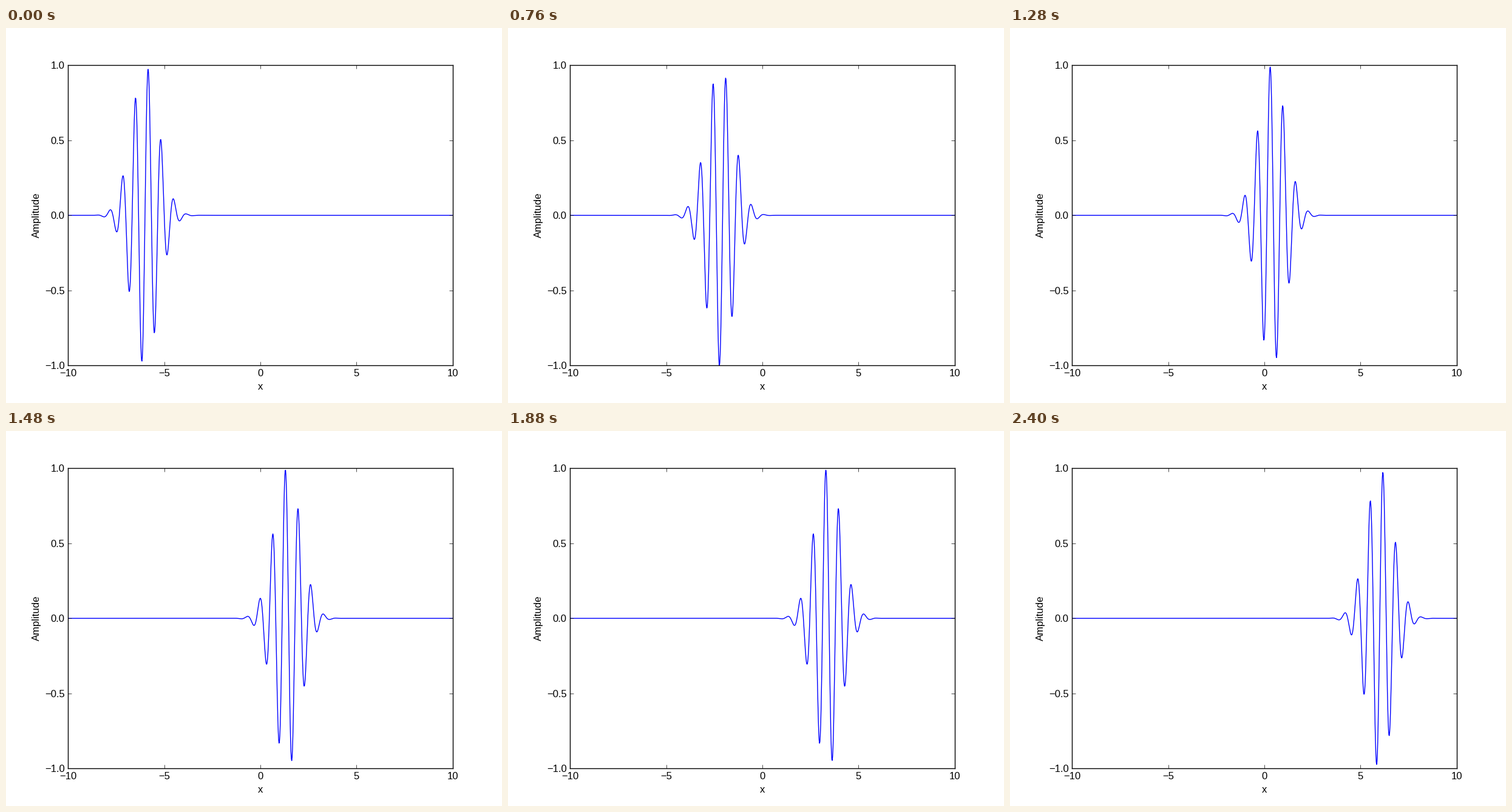
Recreate the animation shown at these times as a matplotlib script. Size 817 by 617 pixels, loop 2.44 s.

```python
import numpy as np
import matplotlib.pyplot as plt
from matplotlib.animation import FuncAnimation

FRAMES, INTERVAL = 61, 40
START, STEP = -6.0, 0.2
WAVENUMBER = 3 * np.pi
PHASE_STEP = 0.2 * np.pi
WIDTH, HEIGHT, DPI = 817, 617, 100

plt.rcParams.update({
    "font.family": "Liberation Sans",
    "font.size": 12,
    "axes.linewidth": 1.0,
    "axes.labelsize": 12,
    "axes.labelpad": 5,
    "axes.axisbelow": False,
    "text.hinting_factor": 8,
})
for side, mirror in (("xtick", "top"), ("ytick", "right")):
    plt.rcParams.update({
        f"{side}.direction": "in",
        f"{side}.{mirror}": True,
        f"{side}.labelsize": 12,
        f"{side}.major.size": 4,
        f"{side}.major.width": 0.5,
        f"{side}.major.pad": 4,
    })

fig = plt.figure(figsize=(WIDTH / DPI, HEIGHT / DPI), dpi=DPI,
                 facecolor="white")
# The plot box in pixels: left, bottom, width, height.
left, bottom, box_w, box_h = 102.19, 61.75, 633.56, 494
ax = fig.add_axes([left / WIDTH, bottom / HEIGHT,
                   box_w / WIDTH, box_h / HEIGHT])
ax.set(xlim=(-10, 10), ylim=(-1, 1), xlabel="x")
ax.set_ylabel("Amplitude", labelpad=4.2)
ax.set_xticks([-10, -5, 0, 5, 10])
ax.set_yticks([-1, -0.5, 0, 0.5, 1])

x = np.linspace(-10, 10, 1000)
line, = ax.plot([], [], color="#0000ff", linewidth=1.0)


def packet(n):
    """Gaussian envelope moving faster than the carrier wave inside it."""
    envelope = np.exp(-(x - START - STEP * n) ** 2)
    return envelope * np.sin(WAVENUMBER * x - PHASE_STEP * n)


def update(n):
    line.set_data(x, packet(n))
    return line,


def init():
    return update(0)


anim = FuncAnimation(fig, update, frames=FRAMES, init_func=init,
                     interval=INTERVAL, repeat=True, repeat_delay=0)
plt.show()
```
